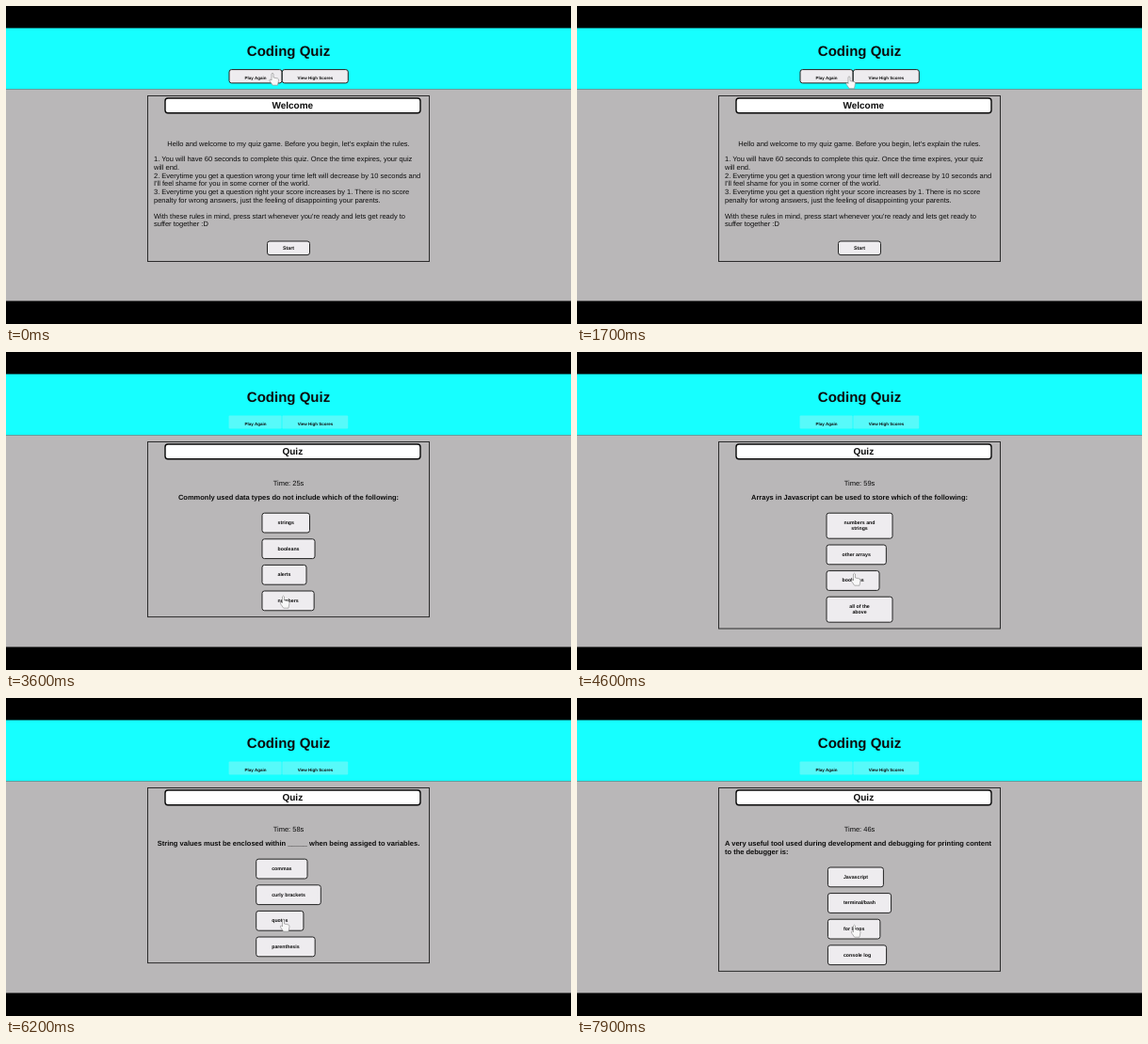
Recreate the animation shown at these times as an HTML page with a canvas. Size 600x338 px, loop 8000 ms.

```html
<!DOCTYPE html>
<html lang="en">
<head>
<meta charset="utf-8">
<title>Coding Quiz</title>
<style>
  html, body { margin: 0; width: 100%; height: 100%; overflow: hidden; background: #000; }
  canvas { display: block; width: 100vw; height: 100vh; }
</style>
</head>
<body>
<canvas id="stage" width="600" height="338"></canvas>
<script>
const ctx = document.getElementById('stage').getContext('2d');
const LOOP = 8000, STEP = 100;
const INK = '#0c0c0c', BUTTON = '#eeecef';

const RULES = [
  '1. You will have 60 seconds to complete this quiz. Once the time expires, your quiz',
  'will end.',
  '2. Everytime you get a question wrong your time left will decrease by 10 seconds and',
  "I'll feel shame for you in some corner of the world.",
  '3. Everytime you get a question right your score increases by 1. There is no score',
  'penalty for wrong answers, just the feeling of disappointing your parents.'
];
const OUTRO = [
  "With these rules in mind, press start whenever you're ready and lets get ready to",
  'suffer together :D'
];

const question = (text, ...options) => () => drawQuestion(text.split('\n'), options);

// Each screen lasts until the next start time.
const SCREENS = [
  [0, drawWelcome],
  [800, drawScores],
  [1500, drawWelcome],
  [3600, question('Commonly used data types do not include which of the following:',
    'strings', 'booleans', 'alerts', 'numbers')],
  [4600, question('Arrays in Javascript can be used to store which of the following:',
    'numbers and\nstrings', 'other arrays', 'booleans', 'all of the\nabove')],
  [5600, question('The condition in an if/else statement is enclosed within _____.',
    'quotes', 'curly brackets', 'parenthesis', 'square\nbrackets')],
  [6200, question('String values must be enclosed within _____ when being assiged to variables.',
    'commas', 'curly brackets', 'quotes', 'parenthesis')],
  [7000, question('A very useful tool used during development and debugging for printing content\nto the debugger is:',
    'Javascript', 'terminal/bash', 'for loops', 'console log')]
];
const CLOCK = [[0, 25], [4600, 59], [5600, 58], [6600, 57], [7600, 46]];

// Pointer tip: time, x, y
const PATH = [
  [100, 282, 71], [500, 322, 74], [900, 322, 74], [1100, 302, 92], [1300, 283, 74],
  [1600, 283, 74], [2300, 318, 78], [2700, 289, 249.5], [2900, 289, 249.5],
  [3400, 293.5, 259], [4200, 293.5, 259], [4400, 293.5, 235], [4800, 293.5, 235],
  [5100, 294, 239], [5400, 293.5, 235], [5700, 293.5, 235], [5900, 294, 250],
  [6000, 294, 246], [6200, 293.5, 235], [6400, 293.5, 235], [6700, 293.5, 238],
  [7300, 293.5, 238], [7900, 293.5, 241]
];
const HAND = new Path2D('M0 1Q1-.6 2 1V5L6.6 6Q7.6 6.4 7.5 8L6.5 13.2H1.2L-2 8.6Q-2.6 7-1 7L0 8Z');
const ARROW = new Path2D('M0 0V10.5L2.4 8.4L4.2 12L5.8 11.2L4.2 7.8H7.4Z');

let time, hotspots;

const latest = list => list.filter(([start]) => start <= time).pop()[1];

function text(str, x, y, size, { bold = false, align = 'left' } = {}) {
  ctx.font = `${bold ? 'bold ' : ''}${size}px "Liberation Sans", Arial, sans-serif`;
  ctx.textAlign = align;
  ctx.fillStyle = INK;
  ctx.fillText(str, x, y);
}
const centered = (str, x, y, size, bold) => text(str, x, y, size, { bold, align: 'center' });
const lines = (list, x, y, style) =>
  list.forEach((line, i) => text(line, x, y + i * 8.7, 7.5, style));

function box(x, y, w, h, fill, stroke, radius = 2.5, width = 1) {
  ctx.beginPath();
  ctx.roundRect(x, y, w, h, radius);
  if (fill) { ctx.fillStyle = fill; ctx.fill(); }
  if (stroke) { ctx.strokeStyle = stroke; ctx.lineWidth = width; ctx.stroke(); }
}

function button(label, x, y, w, h, size, baseline) {
  box(x, y, w, h, BUTTON, '#222');
  label.split('\n').forEach((line, i) =>
    centered(line, x + w / 2, y + baseline + i * 6.1, size, true));
  hotspots.push([x, y, w, h]);
}

function drawPanel(title, bottom) {
  ctx.strokeStyle = '#2b2b2b';
  ctx.lineWidth = 1;
  ctx.strokeRect(150.5, 95.5, 299, bottom - 95.5);
  box(169, 98, 271, 15.7, '#fff', '#080808', 3, 1.4);
  centered(title, 304.3, 109.3, 10, true);
}

function drawNav(enabled) {
  if (enabled) {
    button('Play Again', 237, 67.6, 56, 14.3, 4.5, 10.1);
    button('View High Scores', 293.3, 67.6, 70, 14.3, 4.5, 10.1);
  } else {
    box(236.6, 67.5, 56, 14, '#57fafa', null, 1);
    box(293.4, 67.5, 69.8, 14, '#57fafa', null, 1);
    centered('Play Again', 265, 77.7, 4.5, true);
    centered('View High Scores', 328.5, 77.7, 4.5, true);
  }
}

function drawWelcome() {
  drawNav(true);
  drawPanel('Welcome', 271.5);
  centered("Hello and welcome to my quiz game. Before you begin, let's explain the rules.", 300, 149.1, 7.5);
  lines(RULES, 157, 165.2);
  lines(OUTRO, 157, 225.5);
  button('Start', 277.5, 250, 45, 14.6, 5.25, 9.2);
}

function drawScores() {
  drawNav(true);
  drawPanel('High Scores', 154.5);
  centered('1. ZUPY THE giant: 1', 300, 146.3, 6.2);
}

function drawQuestion(prompt, options) {
  drawNav(false);
  centered(`Time: ${latest(CLOCK)}s`, 300, 141.7, 7.5);
  if (prompt.length > 1) lines(prompt, 157, 156.9, { bold: true });
  else centered(prompt[0], 300, 156.9, 7.5, true);

  ctx.font = 'bold 5.25px "Liberation Sans", Arial, sans-serif';
  const widths = options.map(label =>
    label.includes('\n') ? 70 : ctx.measureText(label).width + 33);
  const left = 300 - Math.max(...widths) / 2;
  let y = 171.2 + (prompt.length - 1) * 8.8;
  options.forEach((label, i) => {
    const height = label.includes('\n') ? 27 : 20.8;
    button(label, left, y, widths[i], height, 5.25, 11.7);
    y += height + 6.8;
  });
  drawPanel('Quiz', y);
}

function drawPointer() {
  let next = PATH.findIndex(([start]) => start > time);
  if (next < 0) next = PATH.length - 1;
  const [t0, x0, y0] = PATH[Math.max(next - 1, 0)];
  const [t1, x1, y1] = PATH[next];
  const k = t1 > t0 ? Math.min((time - t0) / (t1 - t0), 1) : 0;
  const x = x0 + (x1 - x0) * k, y = y0 + (y1 - y0) * k;
  const over = hotspots.some(([bx, by, w, h]) => x > bx && x < bx + w && y > by && y < by + h);
  const shape = over ? HAND : ARROW;
  ctx.save();
  ctx.translate(x, y);
  ctx.fillStyle = '#f8f8f8';
  ctx.strokeStyle = '#858585';
  ctx.lineWidth = 0.6;
  ctx.fill(shape);
  ctx.stroke(shape);
  ctx.restore();
}

function fillBand(top, bottom, color) {
  ctx.fillStyle = color;
  ctx.fillRect(0, top, 600, bottom - top);
}

function draw(now) {
  time = Math.floor((now % LOOP) / STEP) * STEP;
  hotspots = [];
  ctx.textRendering = 'geometricPrecision';
  fillBand(0, 338, '#000');
  fillBand(23.5, 88.5, '#16ffff');
  fillBand(88.5, 313.5, '#b9b7b8');
  centered('Coding Quiz', 300, 53.2, 15, true);
  latest(SCREENS)();
  drawPointer();
}

const startTime = performance.now();
function tick() {
  draw(performance.now() - startTime);
  requestAnimationFrame(tick);
}
tick();
</script>
</body>
</html>
```
